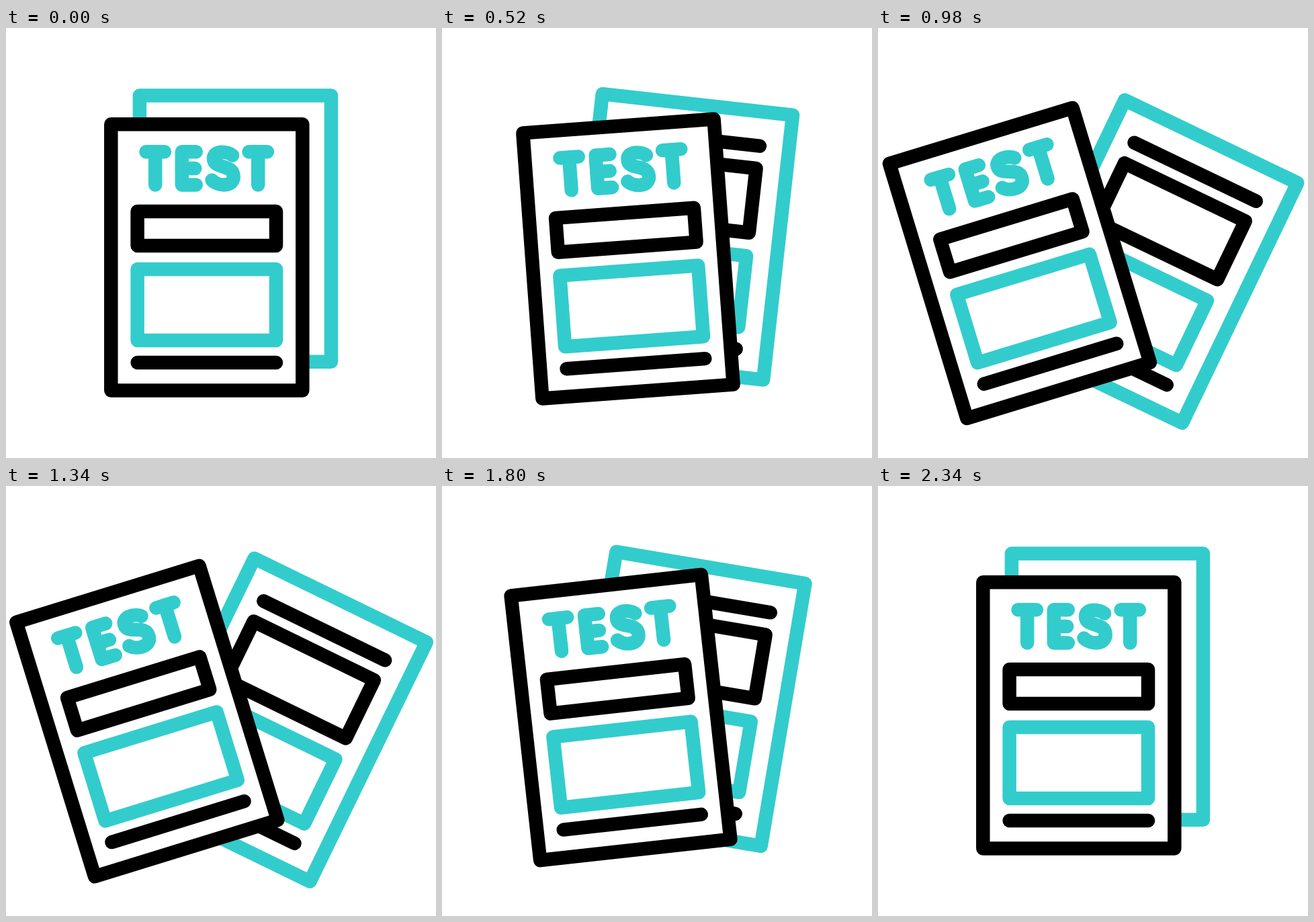
Recreate the animation shown at these times as an HTML page with a canvas. Size 640 px wide and 640 px high, loop 2400 ms.

```html
<!DOCTYPE html>
<html lang="en">
<head>
<meta charset="utf-8">
<title>Test papers</title>
<style>
  html, body { margin: 0; width: 100%; height: 100%; overflow: hidden; background: #fff; }
  canvas { display: block; width: 640px; height: 640px; }
</style>
</head>
<body>
<canvas id="stage" width="640" height="640"></canvas>
<script>
const ctx = document.getElementById('stage').getContext('2d');
const BLACK = '#000', TEAL = '#33cccc';
const LOOP = 2400, OPENED = 1200, CLOSED = 2340;
const PAGE = { w: 285, h: 396.2 };

// Symmetric ease: cubic-bezier(a, 0, 1 - a, 1)
function ease(x, a = 0.817) {
  let lo = 0, hi = 1;
  for (let i = 0; i < 30; i++) {
    const u = (lo + hi) / 2, v = 1 - u;
    const bx = 3 * u * v * v * a + 3 * u * u * v * (1 - a) + u * u * u;
    if (bx < x) lo = u; else hi = u;
  }
  return lo * lo * (3 - 2 * lo);
}

function spread(t) {
  if (t < OPENED) return ease(t / OPENED);
  if (t < CLOSED) return ease((CLOSED - t) / (CLOSED - OPENED));
  return 0;
}

function line(color, ...points) {
  ctx.strokeStyle = color;
  ctx.beginPath();
  for (let i = 0; i < points.length; i += 2) ctx.lineTo(points[i], points[i + 1]);
  ctx.stroke();
}

function box(color, left, top, right, bottom) {
  ctx.strokeStyle = color;
  ctx.strokeRect(left, top, right - left, bottom - top);
}

function letterT(x) {
  line(TEAL, x - 13.7, 184.3, x + 13.7, 184.3);
  line(TEAL, x, 184.3, x, 233.6);
}

function letterE(x) {
  line(TEAL, x + 21, 184.3, x, 184.3, x, 233.6, x + 21, 233.6);
  line(TEAL, x, 209, x + 19.4, 209);
}

function letterS() {
  ctx.beginPath();
  ctx.moveTo(337, 189.5);
  ctx.bezierCurveTo(330, 183.5, 309, 181, 309, 194.5);
  ctx.bezierCurveTo(309, 210.5, 338.7, 202, 338.7, 221);
  ctx.bezierCurveTo(338.7, 237, 316, 236, 306.5, 226.5);
  ctx.stroke();
}

// Draws a sheet around its centre, then its contents in centre-based coordinates
function sheet(color, x, y, degrees, contents) {
  const { w, h } = PAGE;
  ctx.save();
  ctx.translate(x, y);
  ctx.rotate(degrees * Math.PI / 180);
  ctx.fillStyle = '#fff';
  ctx.fillRect(-w / 2, -h / 2, w, h);
  box(color, -w / 2, -h / 2, w / 2, h / 2);
  contents();
  ctx.restore();
}

function backContents() {
  line(BLACK, -102.3, -147, 98.8, -147);
  box(BLACK, -102.3, -113.3, 97.2, -17);
  box(TEAL, -102.3, 17.8, 97.2, 124.5);
  line(BLACK, -102.3, 157, 97.2, 157);
}

function frontContents() {
  ctx.translate(-298.8, -341.4);
  letterT(222.2);
  letterE(261.8);
  letterS();
  letterT(375.2);
  box(BLACK, 195.6, 273, 402, 324);
  box(TEAL, 195.6, 359, 402, 465);
  line(BLACK, 195.6, 498, 402, 498);
}

function draw() {
  const p = spread(performance.now() % LOOP);
  ctx.fillStyle = '#fff';
  ctx.fillRect(0, 0, 640, 640);
  ctx.lineWidth = 20.5;
  ctx.lineCap = ctx.lineJoin = 'round';
  sheet(TEAL, 341.4 + 70.2 * p, 298.7 + 49.9 * p, 26.2 * p, backContents);
  sheet(BLACK, 298.8 - 89.8 * p, 341.4 + 8.7 * p, -17.3 * p, frontContents);
  requestAnimationFrame(draw);
}
draw();
</script>
</body>
</html>
```
